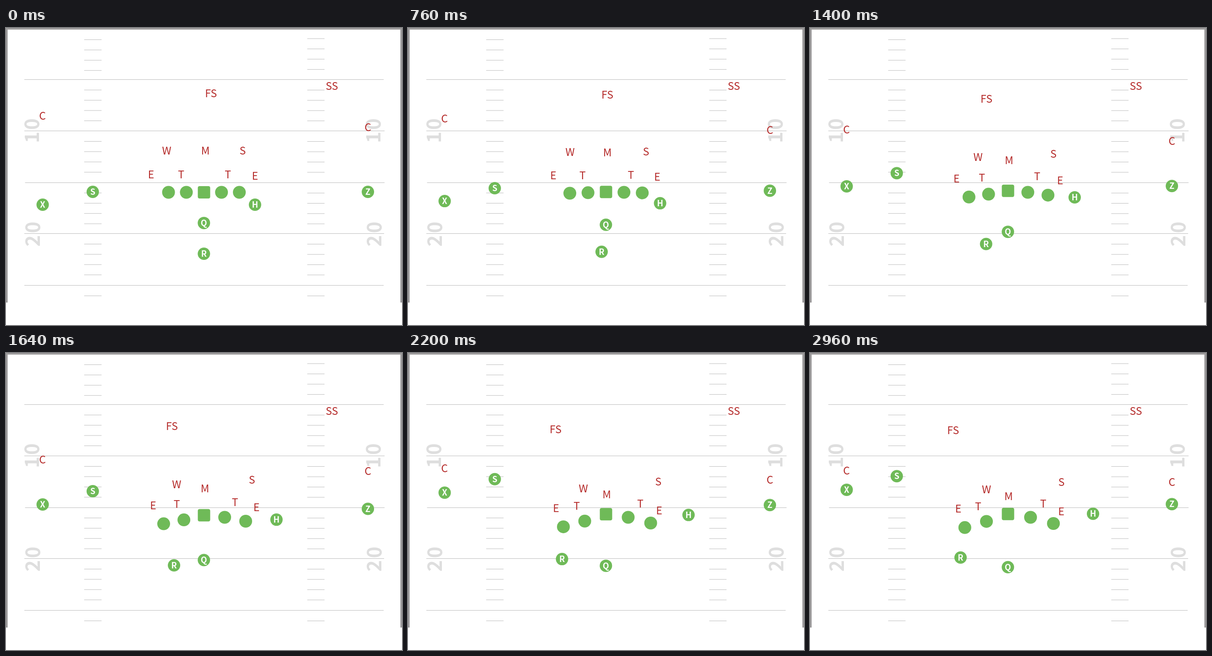
Animation, 864 px wide and 648 px high, one loop 3000 ms. Source, as an HTML page:

```html
<!DOCTYPE html>
<html lang="en">
<head>
<meta charset="utf-8">
<title>Football play</title>
<style>
html, body { margin: 0; width: 100%; height: 100%; overflow: hidden; background: #fff; }
svg { display: block; }
text { font-family: "Noto Sans CJK JP", "Noto Sans CJK SC", "Noto Sans", sans-serif; text-anchor: middle; }
.line { stroke: #bebebe; stroke-width: 1; }
.yard { font-size: 42.5px; font-weight: 700; fill: #dedede; }
.off { fill: #6fba58; }
.label { font-size: 18px; font-weight: 700; fill: #fff; }
.def { font-size: 23px; font-weight: 500; fill: #b52b2a; }
</style>
</head>
<body>
<svg id="stage" width="864" height="648" viewBox="0 0 864 648"></svg>
<script>
const LOOP = 3000, STEP = 40, START = 255, MOVE = 2400;
const stage = document.getElementById('stage');

function add(parent, tag, attrs, text) {
  const el = document.createElementNS('http://www.w3.org/2000/svg', tag);
  for (const key in attrs) el.setAttribute(key, attrs[key]);
  if (text) el.textContent = text;
  return parent.appendChild(el);
}
const line = (x1, x2, y) => add(stage, 'line', { x1, x2, y1: y, y2: y, class: 'line' });
const label = (parent, cls, text) => add(parent, 'text', { class: cls, dy: '.366em' }, text);

// Field
add(stage, 'path', { d: 'M0 599V0H864V599H860.4V3.4H3.6V599Z', fill: '#9d9b9c' });
for (const [x, y, text] of [[56, 238.5, '1'], [56, 209.7, '0'], [801.5, 238.5, '1'], [801.5, 209.7, '0'],
    [58, 464.5, '2'], [58, 435, '0'], [803.7, 464.5, '2'], [803.7, 435, '0']]) {
  label(stage, 'yard', text).setAttribute('transform', `translate(${x} ${y}) rotate(-90)`);
}
[[40, 824, 112.5], [40, 826, 224.5], [41.5, 826, 337.5], [40, 825, 448.5], [40, 824, 561.5]]
  .forEach(l => line(...l));
[25.5, 135.2, 247.4, 359.9, 471.4, 584.3].forEach((top, block) => {
  for (let k = 0; k < (block < 5 ? 4 : 1); k++) {
    line(170.5, 208.5, top + 22.4 * k);
    line(657.3, 695, (block ? top + 0.2 : 23.2) + 22.4 * k);
  }
});

// Players: name, start x, y, end x, y
const offense = [
  ['', 354.6, 358.5, 337.8, 380.8],
  ['', 393.5, 358.5, 385, 367.4],
  ['#', 432, 358.5, 432, 351.3],
  ['', 470.2, 358.5, 481.2, 358.5],
  ['', 509.1, 358.5, 531.1, 372],
  ['X', 80, 385.5, 80, 298.4],
  ['S', 189.3, 357.5, 189.3, 268.8],
  ['Z', 789.6, 357.5, 789.6, 329.8],
  ['H', 543.3, 385.5, 617.5, 350.8],
  ['Q', 431.8, 425.4, 431.8, 467.2],
  ['R', 431.8, 492.5, 328.5, 446.2],
];
const defense = [
  ['C', 79.7, 191.7, 79.7, 256.2],
  ['C', 789.7, 216.7, 789.7, 281.2],
  ['FS', 447.2, 142.7, 312.2, 169],
  ['SS', 711, 126.2, 711, 126.2],
  ['W', 350.5, 268, 385.2, 298],
  ['M', 435.2, 268, 433.4, 312.2],
  ['S', 516.4, 268, 548.5, 281.2],
  ['E', 316.5, 319.8, 323.6, 339.8],
  ['T', 382.2, 319.8, 367, 335],
  ['T', 484.2, 319.8, 508.8, 329],
  ['E', 543.4, 322.2, 548.4, 345.7],
];

function drawOffense(g, name) {
  if (name === '#') {
    add(g, 'rect', { x: -13.5, y: -13.5, width: 27, height: 27, rx: 4, class: 'off' });
    return;
  }
  add(g, 'circle', { r: name ? 13.5 : 14, class: 'off' });
  if (name) label(g, 'label', name);
}
const enlist = draw => ([name, ...path]) => {
  const g = add(stage, 'g');
  draw(g, name);
  return { g, path };
};
const players = [
  ...offense.map(enlist(drawOffense)),
  ...defense.map(enlist((g, name) => label(g, 'def', name))),
];

// Ease-in-out: cubic-bezier(.42, 0, .58, 1)
function ease(u) {
  let lo = 0, hi = 1;
  for (let i = 0; i < 24; i++) {
    const s = (lo + hi) / 2;
    if (((0.52 * s - 0.78) * s + 1.26) * s < u) lo = s; else hi = s;
  }
  return lo * lo * (3 - 2 * lo);
}

function frame() {
  const t = Math.floor(performance.now() % LOOP / STEP) * STEP;
  const e = ease(Math.min(1, Math.max(0, (t - START) / MOVE)));
  for (const { g, path: [x0, y0, x1, y1] } of players) {
    g.setAttribute('transform', `translate(${x0 + (x1 - x0) * e} ${y0 + (y1 - y0) * e})`);
  }
  requestAnimationFrame(frame);
}
frame();
</script>
</body>
</html>
```
